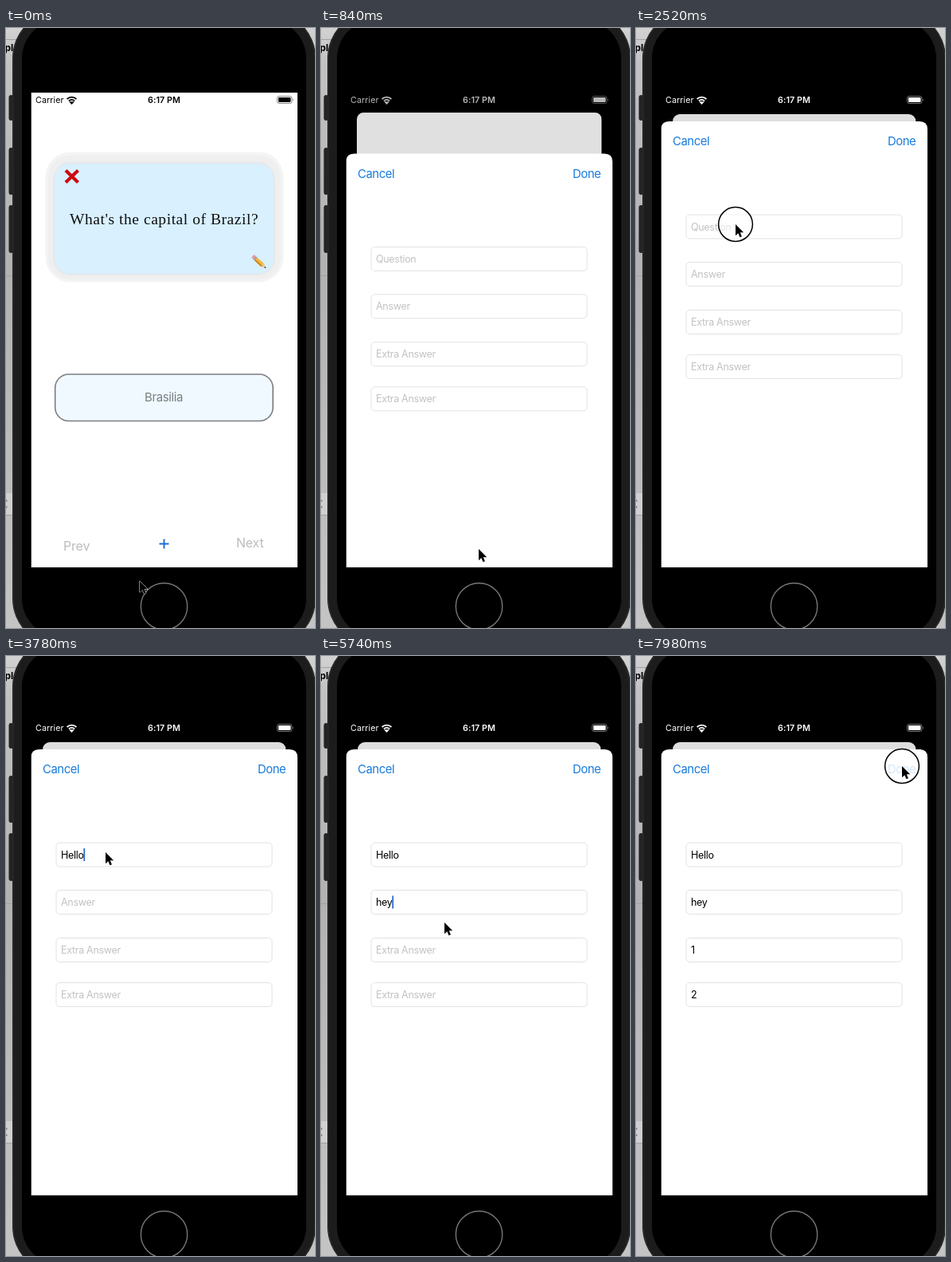
An HTML page for the animation above (8000 ms loop, 388x752 px).

```html
<!DOCTYPE html>
<html lang="en">
<head>
<meta charset="utf-8">
<title>Flashcard app</title>
<style>
  html, body { margin: 0; width: 100%; height: 100%; overflow: hidden; background: #000; }
  svg { display: block; width: 100vw; height: 100vh; }
  text { font-family: Inter, Roboto, "Liberation Sans", sans-serif; white-space: pre; }
  .status { font-size: 10.7px; letter-spacing: .1px; }
  .bar { font-size: 14.9px; letter-spacing: -.45px; fill: #187bdc; }
  .nav { font-size: 16px; letter-spacing: -.2px; fill: #bcbcbe; }
  .field { font-size: 12.5px; letter-spacing: -.3px; }
  .question { font-family: "Liberation Serif", "Noto Serif", serif; font-size: 19.5px; letter-spacing: .55px; fill: #0c1014; }
</style>
</head>
<body>
<svg viewBox="0 0 388 752">
  <defs>
    <clipPath id="screenClip"><rect x="31.5" y="81" width="334.5" height="595"/></clipPath>
    <clipPath id="pageClip"><rect id="pageShape" x="31.5" y="81" width="334.5" height="620"/></clipPath>
    <linearGradient id="desk" x2="0" y2="1">
      <stop offset="0" stop-color="#d2d2d2"/>
      <stop offset=".06" stop-color="#c2c2c2"/>
      <stop offset=".4" stop-color="#b2b2b2"/>
      <stop offset="1" stop-color="#c4c4c4"/>
    </linearGradient>
  </defs>

  <!-- desktop -->
  <rect width="388" height="752" fill="url(#desk)"/>
  <path d="M0 14.5H20M0 310.5H9M0 610.5H9" stroke="#a2a2a2"/>
  <rect y="583" width="9" height="27" fill="#d0d0d0"/>
  <path d="M0 592.5H1.5M0 600.5H1.5" stroke="#777" stroke-width="2"/>
  <text x="-1.5" y="29" font-size="12" font-weight="700">pl</text>

  <!-- phone -->
  <path d="M6.5 87V113M6.5 153V206M6.5 225V279" stroke="#242424" stroke-width="6" stroke-linecap="round"/>
  <rect x="8" y="-22" width="381" height="797" rx="60" fill="#1c1c1c"/>
  <rect x="9" y="-21" width="379" height="795" rx="59" fill="none" stroke="#303030"/>
  <rect x="20" y="-10" width="357" height="773" rx="48"/>
  <circle cx="198.5" cy="725" r="29.2" fill="none" stroke="#777" stroke-width="1.4"/>

  <g clip-path="url(#screenClip)">
    <g id="page">
      <g clip-path="url(#pageClip)">
        <rect x="31.5" y="81" width="334.5" height="620" fill="#fff"/>
        <rect x="49.5" y="155.5" width="299" height="163" rx="31" fill="#f4f4f4"/>
        <rect x="53" y="160" width="292" height="155" rx="27" fill="#efefef"/>
        <rect x="59" y="168" width="279" height="142" rx="22" fill="#e6e8ea"/>
        <rect x="61" y="170" width="275" height="138" rx="20" fill="#d9f0fe"/>
        <path d="M75 178.5L90.5 193.5M90.5 178.5L75 193.5" stroke="#cc0a0f" stroke-width="4.2"/>
        <text class="question" x="80" y="246">What's the capital of Brazil?</text>
        <g transform="translate(310.5 286.5) rotate(42.5)">
          <rect x="-1" y="-2.6" width="4" height="5.2" rx="1.3" fill="#e79aa0"/>
          <rect x="2.4" y="-2.6" width="2.2" height="5.2" fill="#9aa0a5"/>
          <rect x="4.6" y="-2.6" width="11.4" height="5.2" fill="#f5b63c"/>
          <path d="M4.6 1.8H16" stroke="#c9801e" stroke-width="1.7"/>
          <path d="M16-2.6L21.5 0L16 2.6Z" fill="#e6c69b"/>
          <path d="M19.4-1L22 0L19.4 1Z" fill="#333"/>
        </g>
        <rect x="61.7" y="434" width="273.5" height="58.5" rx="17" fill="#f0f9ff" stroke="#7b7c80" stroke-width="1.6"/>
        <text x="174" y="468" font-size="14.9" letter-spacing="-.35" fill="#7a7e82">Brasilia</text>
        <text class="nav" x="72" y="655">Prev</text>
        <text class="nav" x="289" y="651">Next</text>
        <path id="plus" d="M192.5 646.5H204.5M198.5 640.5V652.5" stroke="#186fd0" stroke-width="1.9"/>
        <rect id="dim" x="31.5" y="81" width="334.5" height="620" opacity="0"/>
      </g>
    </g>

    <g id="status" fill="#000">
      <text class="status" x="37" y="94">Carrier</text>
      <text class="status" x="178" y="94" font-weight="600">6:17 PM</text>
      <g id="wifi" fill="none" stroke-width="1.9">
        <path d="M76.6 89A8.6 8.6 0 0 1 88.4 89M78.9 91.4A5.2 5.2 0 0 1 86.1 91.4"/>
        <path d="M81.2 93.2L82.5 94.6L83.8 93.2Z"/>
      </g>
      <rect id="cell" x="340.5" y="85.5" width="18.5" height="9" rx="2.6" fill="none" stroke-opacity=".45"/>
      <rect x="342" y="87" width="15.5" height="6" rx="1.3"/>
      <path d="M360 88.5Q361.6 90 360 91.5Z" opacity=".6"/>
    </g>

    <g id="sheet">
      <path d="M31.5 600V10Q31.5 0 41.5 0H356Q366 0 366 10V600Z" fill="#fff"/>
      <text class="bar" x="46" y="30.3">Cancel</text>
      <text class="bar" id="done" x="316" y="30.3">Done</text>
      <g id="fields"></g>
      <rect id="caret" width="1.7" height="16" fill="#2864c8"/>
    </g>
  </g>

  <circle id="ring" r="21.4" fill="#fff" fill-opacity=".6" stroke="#000" stroke-width="1.5"/>
  <path id="cursor" d="M0 0V14.2L3.3 11.2L5.5 16.2L7.9 15.2L5.8 10.3H10.2Z" fill="#000" stroke="#fff" stroke-width="1" paint-order="stroke" stroke-linejoin="round"/>
</svg>

<script>
const LOOP = 8000, STEP = 70;
const $ = id => document.getElementById(id);
const clamp = v => Math.max(0, Math.min(1, v));
const ramp = (t, a, b) => clamp((t - a) / (b - a));

// pointer stops: time, x, y
const stops = [
  [0, 168, 693], [60, 168, 693], [360, 198, 653], [880, 198, 653],
  [1260, 139, 338], [1400, 132, 278], [1540, 98, 222], [1680, 108, 231],
  [1820, 125, 246], [3880, 125, 246], [4180, 152, 312], [4580, 152, 312],
  [4760, 155, 334], [5740, 155, 334], [5950, 158, 372], [6320, 158, 372],
  [6470, 165, 417], [6700, 165, 417], [6840, 180, 437], [6930, 178, 432],
  [7240, 178, 432], [7800, 334, 138], [LOOP, 334, 138]
];
// press start, press end
const presses = [[460, 680], [2400, 2810], [4190, 4480], [5950, 6160], [6450, 6670], [7830, 9000]];
// top inside the sheet, hint, focus start, focus end, typed text, key times
const inputs = [
  { y: 117, hint: "Question", from: 2730, to: 4410, text: "Hello", keys: [3080, 3290, 3430, 3570, 3710] },
  { y: 176.5, hint: "Answer", from: 4410, to: 6130, text: "hey", keys: [5390, 5460, 5530] },
  { y: 236.5, hint: "Extra Answer", from: 6130, to: 6620, text: "1", keys: [6300] },
  { y: 292.5, hint: "Extra Answer", from: 6620, to: 7280, text: "2", keys: [7210] }
];

function add(name, attrs) {
  const el = document.createElementNS("http://www.w3.org/2000/svg", name);
  for (const k in attrs) el.setAttribute(k, attrs[k]);
  return $("fields").appendChild(el);
}
for (const f of inputs) {
  add("rect", { x: 63, y: f.y, width: 271, height: 30, rx: 4.5, fill: "#fff", stroke: "#e2e2e2" });
  f.label = add("text", { class: "field", x: 69, y: f.y + 19.5 });
}

// smooth pointer path that comes to rest at repeated stops
function slope(i, k) {
  const a = stops[i - 1], b = stops[i], c = stops[i + 1];
  if (!a || !c || a[2] === b[2] || b[2] === c[2]) return 0;
  return (c[k] - a[k]) / (c[0] - a[0]);
}
function pointer(t) {
  let i = 0;
  while (i < stops.length - 2 && t >= stops[i + 1][0]) i++;
  const a = stops[i], b = stops[i + 1], d = b[0] - a[0], u = (t - a[0]) / d;
  return [1, 2].map(k =>
    a[k] + (b[k] - a[k]) * u * u * (3 - 2 * u) +
    d * u * (1 - u) * (slope(i, k) * (1 - u) - slope(i + 1, k) * u));
}

function spring(t) {
  const w = Math.max(0, t - 596) * .0176;
  return 1 - (1 + w) * Math.exp(-w);
}

function drawPage(t, p) {
  const s = 1 - .087 * p;
  $("page").setAttribute("transform", `translate(198.75 ${81 + 27 * p}) scale(${s}) translate(-198.75 -81)`);
  $("pageShape").setAttribute("rx", 9 * p / s);
  $("dim").setAttribute("opacity", .13 * p);
  $("plus").setAttribute("opacity", t >= 490 && t < 620 ? .3 : 1);

  const v = Math.round(255 * ramp(t, 666, 907)), ink = `rgb(${v},${v},${v})`;
  $("status").setAttribute("fill", ink);
  $("wifi").setAttribute("stroke", ink);
  $("cell").setAttribute("stroke", ink);
}

function drawSheet(t, p) {
  $("sheet").setAttribute("transform", `translate(0 ${676 - 559 * p})`);
  $("done").setAttribute("opacity", t >= 7900 ? .45 : 1);
  let caret = 0;
  for (const f of inputs) {
    const typed = f.text.slice(0, f.keys.filter(k => t >= k).length);
    f.label.textContent = typed || f.hint;
    f.label.setAttribute("fill", typed ? "#000" : "#c2c2c4");
    if (t >= f.from && t < f.to) {
      const end = typed ? f.label.getComputedTextLength() : 0;
      $("caret").setAttribute("x", 68.8 + end);
      $("caret").setAttribute("y", f.y + 7);
      caret = t < 5390 ? 1 - ramp(t, 4980, 5180) : 1;
    }
  }
  $("caret").setAttribute("opacity", caret);
}

function drawPointer(t) {
  const at = `translate(${pointer(t)})`;
  const press = Math.max(...presses.map(([a, b]) => Math.min(ramp(t, a, a + 120), ramp(b - t, 0, 100))));
  $("cursor").setAttribute("transform", at);
  $("ring").setAttribute("transform", at);
  $("ring").setAttribute("opacity", press);
}

function draw(now) {
  const t = Math.floor(now % LOOP / STEP) * STEP, p = spring(t);
  drawPage(t, p);
  drawSheet(t, p);
  drawPointer(t);
}

const start = performance.now();
function tick() {
  draw(performance.now() - start);
  requestAnimationFrame(tick);
}
tick();
</script>
</body>
</html>
```
